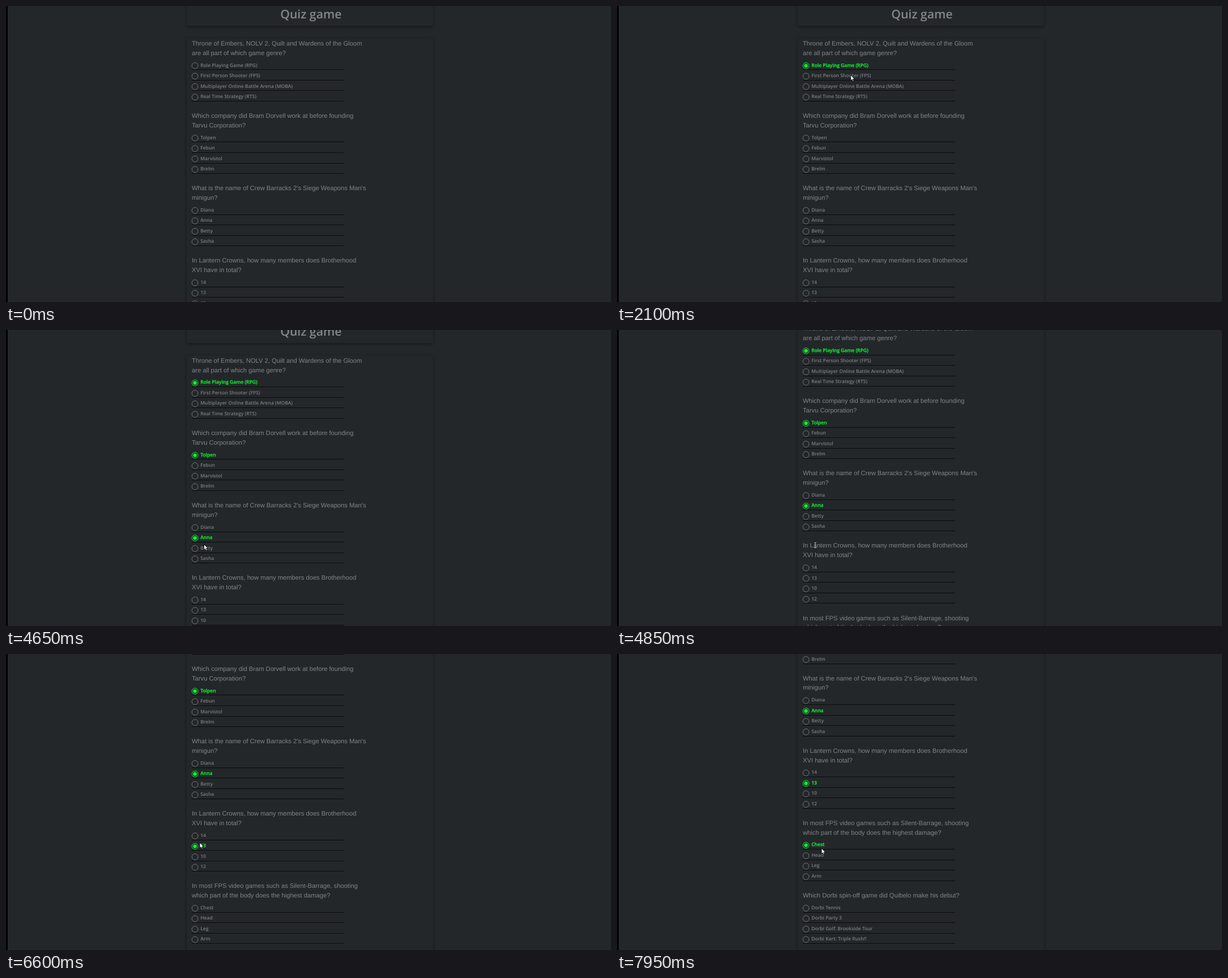
Write an HTML page with a canvas that moves like this. It is 1068x524 px and loops after 8000 ms.

```html
<!DOCTYPE html>
<html lang="en">
<head>
<meta charset="utf-8">
<title>Quiz game</title>
<style>
  html, body { margin: 0; width: 100%; height: 100%; overflow: hidden; background: #23272a; }
  canvas { display: block; }
</style>
</head>
<body>
<canvas id="stage" width="1068" height="524"></canvas>
<script>
const ctx = document.getElementById('stage').getContext('2d');
const LOOP = 8000, STEP = 200 / 3, HOVER_DELAY = 50;
const BG = '#23272a', GREEN = '#11ec30', LINE = '#0a0b0c';
const LEFT = 328, LABEL_LEFT = 343.2, LINE_HEIGHT = 16.8, ROW = 18.5, FIRST_TOP = 57.6, BLOCK = 128.1;
const TITLE_FONT = '600 21.2px "Open Sans", "Noto Sans", sans-serif';
const QUESTION_FONT = '11.2px "Liberation Sans", Arial, sans-serif';
const LABEL_FONT = '600 8.5px "Open Sans", "Noto Sans", sans-serif';

const questions = [
  { lines: ['Throne of Embers, NOLV 2, Quilt and Wardens of the Gloom', 'are all part of which game genre?'],
    labels: ['Role Playing Game (RPG)', 'First Person Shooter (FPS)', 'Multiplayer Online Battle Arena (MOBA)', 'Real Time Strategy (RTS)'] },
  { lines: ['Which company did Bram Dorvell work at before founding', 'Tarvu Corporation?'],
    labels: ['Tolpen', 'Febun', 'Marvistol', 'Brelm'] },
  { lines: ["What is the name of Crew Barracks 2's Siege Weapons Man's", 'minigun?'],
    labels: ['Diana', 'Anna', 'Betty', 'Sasha'] },
  { lines: ['In Lantern Crowns, how many members does Brotherhood', 'XVI have in total?'],
    labels: ['14', '13', '10', '12'] },
  { lines: ['In most FPS video games such as Silent-Barrage, shooting', 'which part of the body does the highest damage?'],
    labels: ['Chest', 'Head', 'Leg', 'Arm'] },
  { lines: ['Which Dorbi spin-off game did Quibelo make his debut?'],
    labels: ['Dorbi Tennis', 'Dorbi Party 3', 'Dorbi Golf: Brookside Tour', 'Dorbi Kart: Triple Rush!!'] }
];
questions.forEach((question, i) => {
  question.top = FIRST_TOP + i * BLOCK;
  question.bottom = question.top + question.lines.length * LINE_HEIGHT;
});
const options = questions.flatMap((question, group) => question.labels.map((label, i) =>
  ({ label, group, y: question.bottom + 13.2 + i * ROW })));

const easeIn = p => p ** 1.9;
const easeOut = p => 1 - easeIn(1 - p);

// A move first shows at `at` and then advances in equal time steps.
const move = (at, steps, to, ease = easeOut) =>
  ({ start: at - STEP, end: at + (steps - 1) * STEP, steps, to, ease });

const pointerStart = [1048, 570];
const pointerMoves = [
  move(190, 13, [432, 142]),
  move(1060, 6, [421, 103]),
  move(2100, 12, [365, 230]),
  move(3370, 9, [349.5, 379.5]),
  move(5320, 1, [346, 361]),
  move(5540, 3, [344, 340]),
  move(6390, 4, [342, 334]),
  move(6950, 1, [344, 334]),
  move(7080, 1, [376, 375]),
  move(7150, 7, [361, 344])
];
const scrollMoves = [move(4580, 8, [168], easeIn), move(6816, 13, [279.5])];
const clicks = [1830, 3300, 4250, 6090, 7880];

function follow(from, moves, t) {
  return moves.reduce((position, { start, steps, to, ease }) => {
    const done = Math.floor((t - start) / STEP + 0.1);
    const k = ease(Math.min(Math.max(done / steps, 0), 1));
    return position.map((v, i) => v + (to[i] - v) * k);
  }, from);
}
const pointerAt = t => follow(pointerStart, pointerMoves, t);
const scrollAt = t => follow([0], scrollMoves, t)[0];

function optionAt(t) {
  const [x, y] = pointerAt(t), pageY = y + scrollAt(t);
  ctx.font = LABEL_FONT;
  return options.find(o => pageY > o.y - ROW + 8 && pageY <= o.y + 8 &&
    x > LEFT && x < LABEL_LEFT + ctx.measureText(o.label).width + 3);
}

// While the page scrolls, hover only refreshes when the pointer has moved.
function hoveredAt(t) {
  const time = t - HOVER_DELAY;
  const scrolling = scrollMoves.find(s => t >= s.start && t < s.end);
  if (!scrolling) return optionAt(time);
  const rests = pointerMoves.map(m => m.end).filter(end => end <= time);
  return optionAt(Math.max(scrolling.start, ...rests));
}

function card(top, bottom) {
  ctx.save();
  ctx.shadowColor = 'rgba(0,0,0,.4)';
  ctx.shadowBlur = 5;
  ctx.shadowOffsetY = 1.5;
  ctx.fillStyle = BG;
  ctx.beginPath();
  ctx.roundRect(318.5, top, 435.5, bottom - top, 3);
  ctx.fill();
  ctx.restore();
}

function text(string, x, y, font, color) {
  ctx.font = font;
  ctx.fillStyle = color;
  ctx.fillText(string, x, y);
}

function circle(x, y, r) {
  ctx.beginPath();
  ctx.arc(x, y, r, 0, Math.PI * 2);
}

function drawOption(label, y, checked, hovered) {
  const active = checked || hovered;
  circle(333.6, y + 1.3, 5.4);
  ctx.strokeStyle = active ? GREEN : '#74787a';
  ctx.lineWidth = 1;
  ctx.stroke();
  if (checked) {
    circle(333.6, y + 1.3, 3.3);
    ctx.fillStyle = GREEN;
    ctx.fill();
  }
  text(label, LABEL_LEFT, y + 3.1, LABEL_FONT, active ? GREEN : '#7c7f81');
  if (active) {
    ctx.lineWidth = 0.3;
    ctx.strokeText(label, LABEL_LEFT, y + 3.1);
  }
  ctx.fillStyle = LINE;
  ctx.fillRect(LEFT, Math.round(y + 8), 268.5, 1);
}

function drawTextPointer(x, y) {
  ctx.strokeStyle = '#b4b6b7';
  ctx.lineWidth = 0.9;
  ctx.beginPath();
  for (const end of [y - 3, y + 6]) {
    ctx.moveTo(x - 1.5, end);
    ctx.lineTo(x + 2.5, end);
  }
  ctx.moveTo(x + 0.5, y - 3);
  ctx.lineTo(x + 0.5, y + 6);
  ctx.stroke();
}

function drawArrow(x, y) {
  const outline = [[0, 0], [0, 9.6], [2.2, 7.6], [3.8, 11], [5.4, 10.3], [3.9, 7.1], [6.8, 6.9]];
  ctx.beginPath();
  outline.forEach(([dx, dy]) => ctx.lineTo(x + dx, y + dy));
  ctx.closePath();
  ctx.fillStyle = '#fff';
  ctx.strokeStyle = '#000';
  ctx.lineWidth = 0.8;
  ctx.fill();
  ctx.stroke();
}

function draw(t) {
  ctx.textRendering = 'geometricPrecision';
  const scroll = scrollAt(t), [x, y] = pointerAt(t);
  const hovered = hoveredAt(t);
  const checked = clicks.filter(click => click <= t).map(optionAt);

  ctx.fillStyle = BG;
  ctx.fillRect(0, 0, 1068, 524);
  card(57 - scroll, 1400);
  card(-20 - scroll, 35 - scroll);
  ctx.textAlign = 'center';
  text('Quiz game', 538.3, 21.7 - scroll, TITLE_FONT, '#858788');
  ctx.textAlign = 'left';

  for (const { lines, top } of questions) {
    lines.forEach((line, i) =>
      text(line, LEFT, Math.round(top + i * LINE_HEIGHT + 12.3 - scroll), QUESTION_FONT, '#828587'));
  }
  for (const option of options) {
    drawOption(option.label, option.y - scroll, checked.includes(option), option === hovered);
  }

  ctx.fillStyle = '#000';
  ctx.fillRect(0, 0, 3, 524);
  const overText = questions.some(q => x > LEFT && x < 636 && y + scroll > q.top && y + scroll < q.bottom);
  (overText ? drawTextPointer : drawArrow)(x, y);
}

function tick() {
  draw(performance.now() % LOOP);
  requestAnimationFrame(tick);
}
tick();
</script>
</body>
</html>
```
